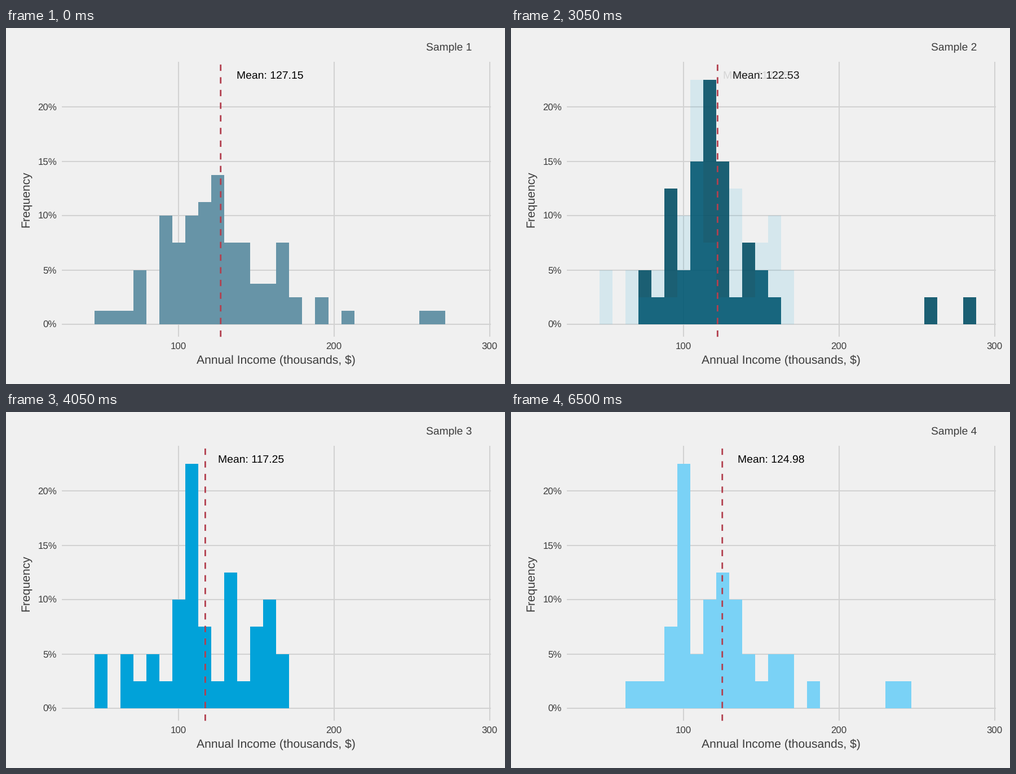
A matplotlib script that plays this animation: 885x632 px, repeating every 8000 ms.

```python
import matplotlib.pyplot as plt
import numpy as np
from matplotlib.animation import FuncAnimation

W, H, DPI = 885, 632, 100
LOOP_MS, TICK_MS = 8000, 40
BACK, GRID, INK, MEAN_RED = "#f0f0f0", "#d2d2d2", "#3c3c3c", "#b2404f"
LEFT, RIGHT, TOP, BOTTOM = 99.2, 859.5, 60.4, 548.2

# The morphs advance at 9 steps per second; each starts 23 steps after the last.
FIRST_STEP_MS, STEP_RATE = 500, 9
MORPH_STEPS, PERIOD_STEPS = 9, 23

# colour, mean, percent per observation, {first bin: counts of the run}
SAMPLES = [
    ("#6794a7", 127.15, 1.25,
     {1: [1, 1, 1, 4], 6: [8, 6, 8, 9, 11, 6, 6, 3, 3, 6, 2],
      18: [2], 20: [1], 26: [1, 1]}),
    ("#014d64", 122.53, 2.5,
     {4: [2, 1, 5, 2, 6, 9, 6, 1, 3, 2, 1], 26: [1], 29: [1]}),
    ("#01a2d9", 117.25, 2.5,
     {1: [2], 3: [2, 1, 2, 1, 4, 9, 3, 1, 5, 1, 3, 4, 2]}),
    ("#7ad2f6", 124.98, 2.5,
     {3: [1, 1, 1, 3, 9, 2, 4, 5, 4, 2, 1, 2, 2], 17: [1], 23: [1, 1]}),
]
MEANS = [sample[1] for sample in SAMPLES]
BIN_EDGES = 133.75 + 23.04 * np.arange(31)

plt.rcParams["font.family"] = "Liberation Sans"
plt.rcParams["text.hinting"] = "none"


def points(pixels):
    return pixels * 72 / DPI


def x_px(income):
    return 305.8 + 2.759 * (income - 100)


def y_px(percent):
    return 526 - 19.28 * percent


fig = plt.figure(figsize=(W / DPI, H / DPI), dpi=DPI, facecolor=BACK)
ax = fig.add_axes([0, 0, 1, 1])
ax.set(xlim=(0, W), ylim=(H, 0))
ax.axis("off")


def label(x, baseline, text, size, color=INK, ha="center", **style):
    return ax.text(x, baseline, text, fontsize=points(size), color=color,
                   ha=ha, va="baseline", **style)


def line(xs, ys, width, color, **style):
    return ax.plot(xs, ys, color=color, lw=points(width),
                   solid_capstyle="butt", **style)[0]


def draw_bars(color, unit, runs):
    percent = np.zeros(len(BIN_EDGES) - 1)
    for start, counts in runs.items():
        percent[start:start + len(counts)] = unit * np.array(counts)
    return ax.stairs(y_px(percent), BIN_EDGES, baseline=y_px(0), fill=True,
                     color=color, lw=0, zorder=3)


for percent in range(0, 25, 5):
    y = y_px(percent)
    line([LEFT, RIGHT], [y, y], 2.04, GRID, zorder=1)
    label(90, y + 6, f"{percent}%", 16.9, ha="right")
for income in (100, 200, 300):
    x = x_px(income)
    line([x, x], [TOP, BOTTOM], 2.04, GRID, zorder=1)
    label(x, 571, str(income), 16.9)
label((LEFT + RIGHT) / 2, 596, "Annual Income (thousands, $)", 21.2)
label(41, (TOP + BOTTOM) / 2, "Frequency", 21.2, rotation=90,
      rotation_mode="anchor")

title = label(745, 40, "", 19.3, ha="left")
bars = [draw_bars(color, unit, runs) for color, _, unit, runs in SAMPLES]
mean_line = line([0, 0], [BOTTOM, TOP], 2.81, MEAN_RED, zorder=4,
                 linestyle=(0, (4, 4)), snap=False)
mean_labels = [label(x_px(1.25 * mean), 90, f"Mean: {mean:.2f}", 19.4,
                     "black", zorder=5) for mean in MEANS]


def morph_position(ms):
    """Position along the samples: whole numbers rest, fractions crossfade."""
    step = max(0, int((ms - FIRST_STEP_MS) * STEP_RATE // 1000) + 1)
    done, within = divmod(step, PERIOD_STEPS)
    return min(done + min(within / MORPH_STEPS, 1), len(SAMPLES) - 1)


def update(tick):
    position = morph_position((tick + 1) * TICK_MS - 1)
    for i, (bar, text) in enumerate(zip(bars, mean_labels)):
        alpha = max(0, 1 - abs(position - i))
        for artist in (bar, text):
            artist.set_alpha(alpha)
            artist.set_visible(alpha > 0)
    x = x_px(np.interp(position, range(len(MEANS)), MEANS))
    mean_line.set_xdata([x, x])
    title.set_text(f"Sample {int(position + 0.5) + 1}")


animation = FuncAnimation(fig, update, frames=LOOP_MS // TICK_MS,
                          interval=TICK_MS, repeat=True, repeat_delay=0)
plt.show()
```
